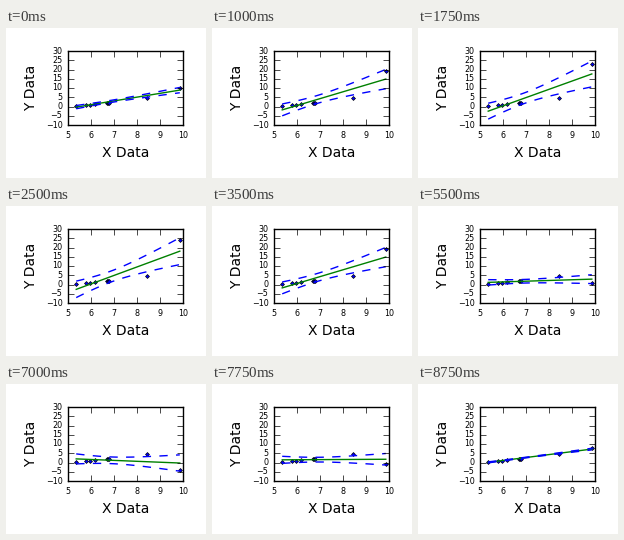
Recreate the animation shown at these times as a matplotlib script. Size 200 px wide and 150 px high, loop 9 s.

```python
import numpy as np
import matplotlib.pyplot as plt
from matplotlib.animation import FuncAnimation

W, H, DPI = 200, 150, 100
FRAMES, INTERVAL = 36, 250
T_95 = 2.3646  # two-sided 95 % Student t, 7 degrees of freedom

X = np.array([5.357, 5.797, 5.936, 6.161, 6.697, 6.731, 6.775, 8.442, 9.861])
Y = np.array([0.376, 0.874, 1.049, 1.327, 2.054, 2.077, 2.138, 4.744, 7.104])
GRID = np.linspace(X[0], X[-1], 100)

plt.style.use("classic")
plt.rcParams.update({
    "font.family": "DejaVu Sans",
    "font.size": 10,
    "axes.labelsize": "medium",
    "xtick.labelsize": "xx-small",
    "ytick.labelsize": "xx-small",
    "figure.facecolor": "white",
    "savefig.facecolor": "white",
    "savefig.dpi": DPI,
})


def fit_band(x, y, at):
    """Least-squares line and the half-width of its confidence band."""
    n, mean = len(x), x.mean()
    sxx = ((x - mean) ** 2).sum()
    slope = ((x - mean) * y).sum() / sxx
    line = y.mean() + slope * (at - mean)
    resid = y - y.mean() - slope * (x - mean)
    var = (resid ** 2).sum() / (n - 2)
    half = T_95 * np.sqrt(var * (1 / n + (at - mean) ** 2 / sxx))
    return line, half


fig = plt.figure(figsize=(W / DPI, H / DPI), dpi=DPI)
left, right, top, bottom = 62, 177, 23, 97
ax = fig.add_axes([left / W, 1 - bottom / H, (right - left) / W, (bottom - top) / H])
ax.set(xlim=(5, 10), ylim=(-10, 30))
ax.set_xticks(range(5, 11))
ax.set_yticks(range(-10, 31, 5))

label = dict(ha="center", va="baseline", rotation_mode="anchor")
fig.text((left + right) / 2 / W, 1 - 129 / H, "X Data", **label)
fig.text(29 / W, 1 - (top + bottom) / 2 / H, "Y Data", rotation=90, **label)

points, = ax.plot(X, Y, "bD", markersize=2)
model, = ax.plot(GRID, GRID, "g-")
upper, = ax.plot(GRID, GRID, "b--")
lower, = ax.plot(GRID, GRID, "b--")


def update(i):
    y = Y.copy()
    y[-1] = 10 + 14 * np.sin(2 * np.pi * i / FRAMES)
    line, half = fit_band(X, y, GRID)
    points.set_ydata(y)
    model.set_ydata(line)
    upper.set_ydata(line + half)
    lower.set_ydata(line - half)
    return points, model, upper, lower


anim = FuncAnimation(fig, update, frames=FRAMES, interval=INTERVAL,
                     repeat=True, repeat_delay=0)
plt.show()
```
